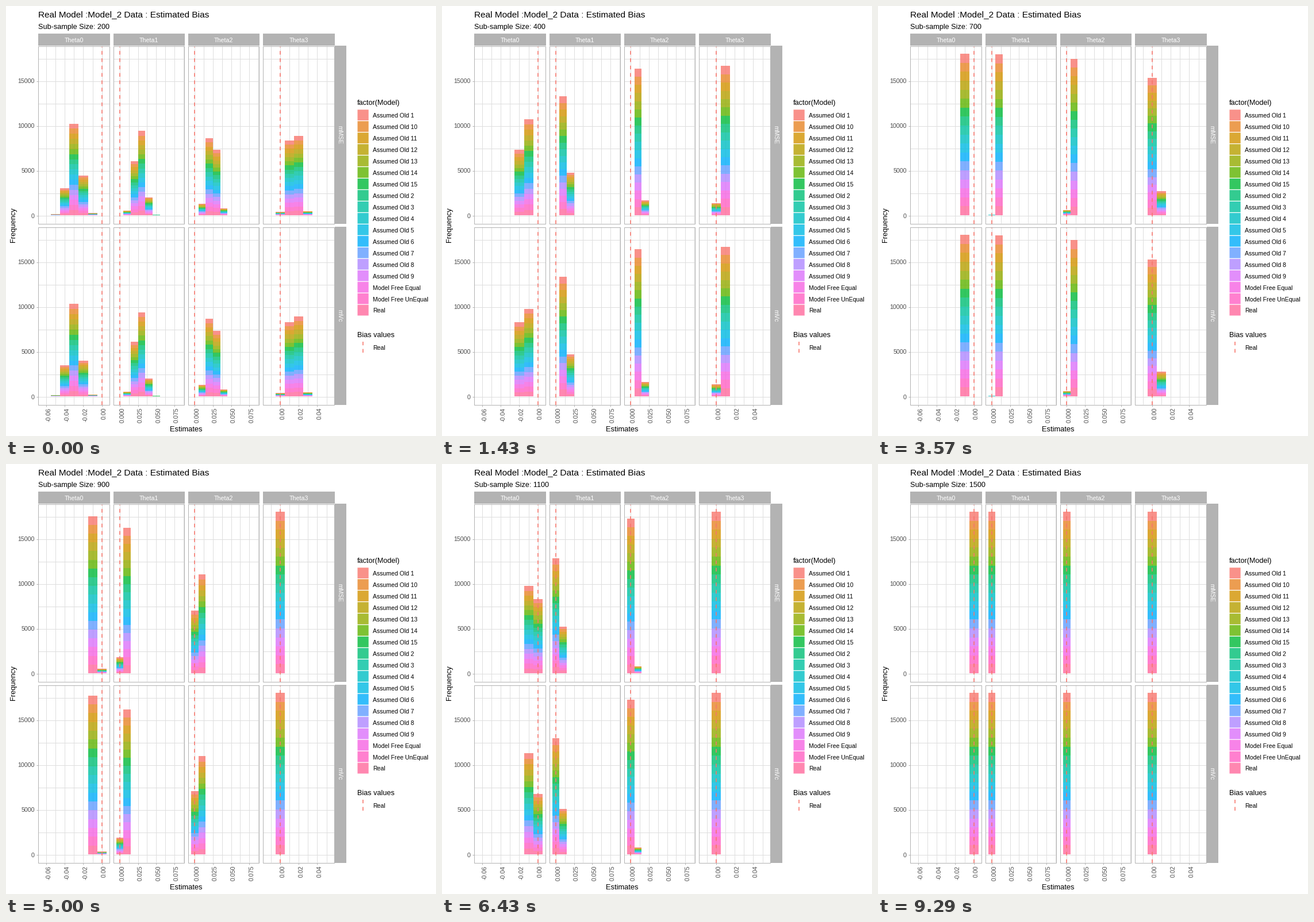
A matplotlib script for the animation above (10000 ms loop, 748x748 px).

```python
import math

import matplotlib.pyplot as plt
from matplotlib.animation import FuncAnimation
from matplotlib.collections import LineCollection, PolyCollection
from matplotlib.patches import Rectangle

plt.rcParams["font.family"] = "Liberation Sans"

SIDE, DPI = 748, 100
FRAMES, LOOP_MS = 200, 10000
STEPS = 14
TOTAL = 18000
PX_PER_COUNT = 281 / TOTAL
MODELS = (sorted("Assumed Old %d" % k for k in range(1, 16))
          + ["Model Free Equal", "Model Free UnEqual", "Real"])
GREY, GRID, DARK = "#b3b3b3", "#dedede", "#4d4d4d"

# x of zero, pixels per 0.01, sign of the bias, major step, labels, decimals,
# spread at size 200, bias scale per row
PANELS = [
    (166.55, 16.03, -1, 2, 4, 2, 0.630, (582, 594)),
    (198.0, 12.65, 1, 2.5, 4, 3, 0.645, (546, 545)),
    (328.3, 12.65, 1, 2.5, 4, 3, 0.630, (485, 484)),
    (477.0, 16.1, 1, 2, 3, 2, 0.500, (305, 306)),
]
# name, top, bottom, y of zero
ROWS = [("mMSE", 69, 378, 364), ("mVc", 384, 693, 679)]


def hcl(hue, chroma=100, lum=65):
    """Polar LUV colour to sRGB."""
    u_n, v_n = 0.19784, 0.46834
    y = ((lum + 16) / 116) ** 3
    u = chroma * math.cos(math.radians(hue)) / (13 * lum) + u_n
    v = chroma * math.sin(math.radians(hue)) / (13 * lum) + v_n
    x = 9 * y * u / (4 * v)
    z = -x / 3 - 5 * y + 3 * y / v
    linear = (3.240479 * x - 1.537150 * y - 0.498535 * z,
              -0.969256 * x + 1.875992 * y + 0.041556 * z,
              0.055648 * x - 0.204043 * y + 1.057311 * z)
    gamma = [1.055 * c ** (1 / 2.4) - 0.055 if c > 0.00304 else 12.92 * c for c in linear]
    return tuple(min(1, max(0, c)) for c in gamma)


COLORS = [hcl(15 + 20 * k) + (0.8,) for k in range(len(MODELS))]
RED = hcl(15)

fig = plt.figure(figsize=(SIDE / DPI, SIDE / DPI), dpi=DPI, facecolor="white")
ax = fig.add_axes([0, 0, 1, 1])
ax.set_xlim(0, SIDE)
ax.set_ylim(SIDE, 0)
ax.axis("off")


def text(x, y, s, px, color="black", ha="left", va="baseline", rot=0):
    return ax.text(x, y, s, fontsize=px * 72 / DPI, color=color, ha=ha, va=va,
                   rotation=rot, zorder=6)


def hline(x0, x1, y):
    return [(x0, round(y) + 0.5), (x1, round(y) + 0.5)]


def vline(x, y0, y1):
    return [(round(x) + 0.5, y0), (round(x) + 0.5, y1)]


def dashed(x, bottom, top):
    ax.plot([x, x], [bottom, top], color=RED, lw=1.6 * 72 / DPI, zorder=4,
            linestyle=(0, (4, 4)), dash_capstyle="butt")


def box(x, y, w, h, color, **kw):
    ax.add_patch(Rectangle((x, y), w, h, fc=color, ec="none", lw=0, **kw))


def draw_panels():
    grid, ticks = [], []
    for i, (zero, unit, sign, step, n_labels, decimals, _, _) in enumerate(PANELS):
        left, right = round(56.5 + 130.3 * i), round(179.9 + 130.3 * i)
        box(left, 48, right - left + 1, 21, GREY)
        text((left + right) / 2, 63, "Theta%d" % i, 10.6, "white", ha="center")
        for _, top, bottom, base in ROWS:
            grid += [hline(left, right, base - k * 2500 * PX_PER_COUNT) for k in range(8)]
            xs = [zero + k * step / 2 * unit for k in range(-10, 11)]
            grid += [vline(x, top, bottom) for x in xs if left + 1 < x < right]
            dashed(zero, bottom + 0.5, top + 0.5)
            ax.add_patch(Rectangle((left + 0.5, top + 0.5), right - left, bottom - top,
                                   fc="none", ec=GREY, lw=72 / DPI, zorder=5))
        for k in range(n_labels):
            x = zero + sign * k * step * unit
            ticks.append(vline(x, 694, 697))
            text(x + 4.2, 698.5, "%.*f" % (decimals, sign * k * step / 100), 10.6, DARK,
                 ha="center", va="top", rot=90)

    for name, top, bottom, base in ROWS:
        box(572, top, 20, bottom - top + 1, GREY)
        text(580, (top + bottom) / 2, name, 10.6, "white", "center", "center", -90)
        for k in range(4):
            y = base - k * 5000 * PX_PER_COUNT
            ticks.append(hline(53, 56, y))
            text(50, y + 4.5, str(5000 * k), 10.6, DARK, ha="right")

    for segments, color in ((grid, GRID), (ticks, GREY)):
        ax.add_collection(LineCollection(segments, colors=color, linewidths=72 / DPI,
                                         zorder=1), autolim=False)


def draw_labels():
    text(56, 19, "Real Model :Model_2 Data : Estimated Bias", 15.35)
    text(313.5, 740, "Estimates", 12.9, ha="center")
    text(13, 381, "Frequency", 12.9, ha="center", va="center", rot=90)
    text(611, 172, "factor(Model)", 12.6)
    for k, (name, color) in enumerate(zip(MODELS, COLORS)):
        y = 180.3 + 19.97 * k
        box(611.5, y, 19.2, 18.7, color, snap=False)
        text(637.7, y + 13.7, name, 10.55)
    text(611, 576, "Bias values", 12.6)
    dashed(621.5, 603, 583.5)
    text(637.7, 598, "Real", 10.55)


def below(edge, size, spread, scale):
    """Number of estimates with |bias| under edge (in 0.01) for a sub-sample size."""
    mean = scale / size - 2.2e-5 * size
    sd = spread * (200 / size) ** 1.5
    return TOTAL * 0.5 * (1 + math.erf((edge - mean) / (sd * math.sqrt(2))))


def stacked_bars(size):
    verts, fills = [], []
    n = len(COLORS)
    for zero, unit, sign, _, _, _, spread, scales in PANELS:
        for (_, _, _, base), scale in zip(ROWS, scales):
            done = 0
            for j in range(6):
                reached = below(j + 0.5, size, spread, scale)
                height, done = (reached - done) * PX_PER_COUNT, reached
                x0 = round(zero + (sign * j - 0.5) * unit)
                x1 = round(zero + (sign * j + 0.5) * unit)
                ys = [round(base - height * k / n) for k in range(n + 1)]
                for lo, hi, color in zip(ys, ys[1:], reversed(COLORS)):
                    if lo > hi:
                        verts.append([(x0, lo), (x1, lo), (x1, hi), (x0, hi)])
                        fills.append(color)
    return verts, fills


draw_panels()
draw_labels()
subtitle = text(56, 40, "", 12.65)
bars = PolyCollection([], antialiaseds=False, linewidths=0, zorder=3)
ax.add_collection(bars, autolim=False)


def update(i):
    # each size starts on the last frame at or before its share of the loop
    step = ((i + 1) * STEPS - 1) // FRAMES
    size = 200 + 100 * step
    verts, fills = stacked_bars(size)
    bars.set_verts(verts)
    bars.set_facecolor(fills)
    subtitle.set_text("Sub-sample Size: %d" % size)
    return bars, subtitle


anim = FuncAnimation(fig, update, frames=FRAMES, interval=LOOP_MS / FRAMES,
                     repeat=True, repeat_delay=0, blit=False)
plt.show()
```
